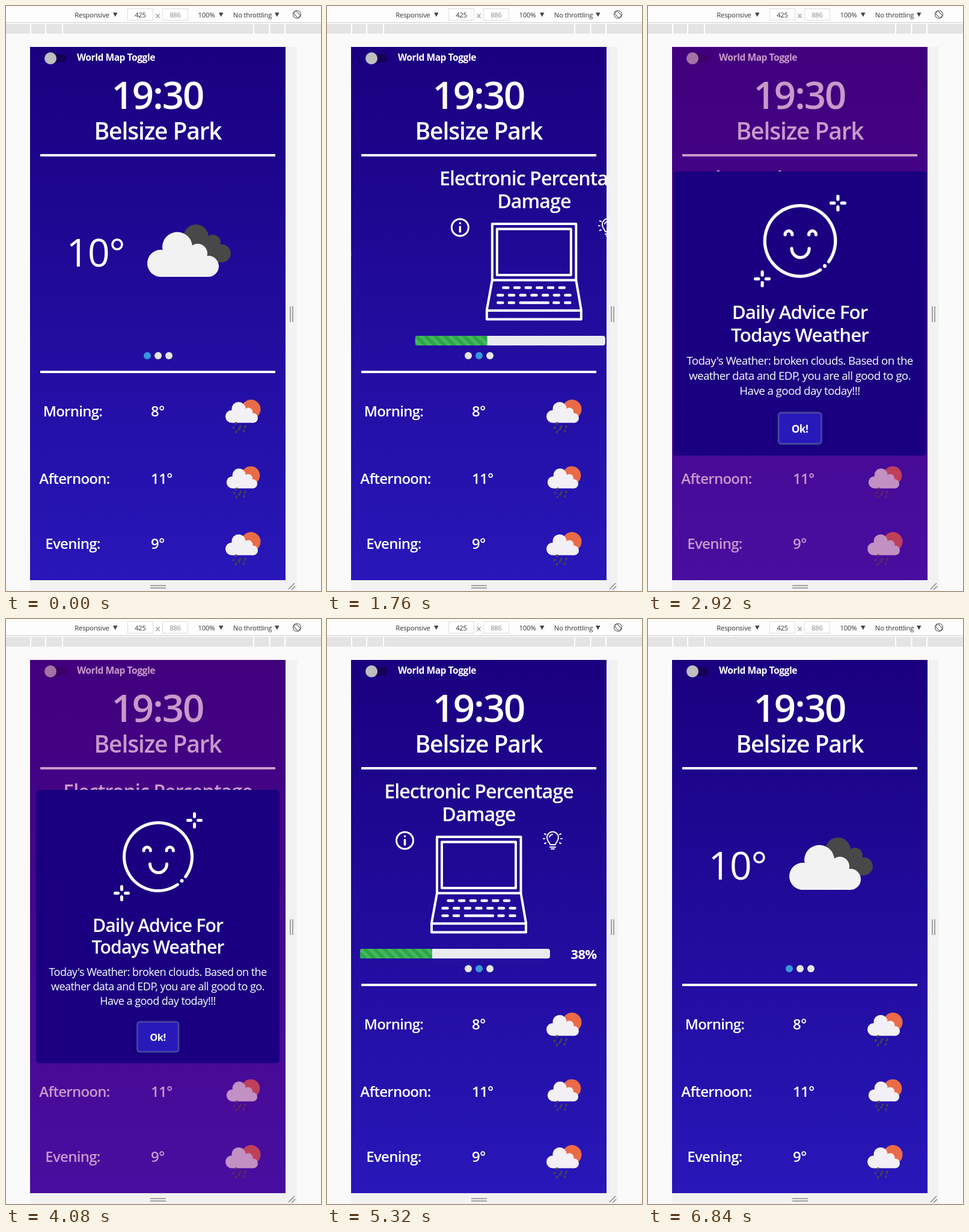
These frames come from a looping animation (524 by 972 pixels, 6880 ms). An HTML page:

```html
<!DOCTYPE html>
<html lang="en">
<head>
<meta charset="utf-8">
<title>Weather app</title>
<style>
  html, body { margin: 0; width: 100%; height: 100%; overflow: hidden; background: #fafafa; }
  svg { display: block; width: 524px; height: 972px; }
  text { font-family: "Open Sans", "Noto Sans", sans-serif; fill: #fff; letter-spacing: -.02em; text-anchor: middle; }
  .semi { font-weight: 600; letter-spacing: -.03em; }
  .bold { font-weight: 700; letter-spacing: -.03em; }
  .body { font-weight: 500; letter-spacing: -.03em; }
  .semi text, .body text { letter-spacing: inherit; }
  .tool text { font-size: 11.3px; fill: #333; }
  .line { fill: none; stroke: #fff; stroke-linecap: round; stroke-linejoin: round; }
  .start { text-anchor: start; }
</style>
</head>
<body>
<svg viewBox="0 0 524 972">
  <defs>
    <linearGradient id="night" x1="0" y1="0" x2="0" y2="1">
      <stop offset="0" stop-color="#1a007f"/>
      <stop offset="1" stop-color="#2817b9"/>
    </linearGradient>
    <clipPath id="panel"><rect x="40" y="68" width="425" height="886"/></clipPath>
    <clipPath id="done"><path d="M175 548v16H59a4 4 0 0 1-4-4v-8a4 4 0 0 1 4-4z"/></clipPath>
    <pattern id="stripes" width="16" height="16" y="548" patternUnits="userSpaceOnUse">
      <path d="M0 0L16 16H8L0 8zM8 0H16V8z" fill="#fff" fill-opacity=".15"/>
    </pattern>
    <g id="shower">
      <circle cx="407.500" cy="670" r="16" fill="#ea6b48"/>
      <g fill="#f2f0f4">
        <circle cx="375.500" cy="682" r="10.500"/>
        <circle cx="387" cy="669.500" r="11.500"/>
        <circle cx="403" cy="675" r="7.500"/>
        <circle cx="411" cy="684.500" r="8"/>
        <path d="M376 672h28l7 10v10.500H376z"/>
      </g>
      <path d="M383 692.500l-1 2M390 698l-1 2M379 699.500l-1 2M398.500 698l-1.500 2.500M388 702l-1 2M396 705.500l-1 2M383 706.500l-1 2"
        stroke="#484848" stroke-width="2.800" stroke-linecap="round"/>
    </g>
    <path id="sparkle" class="line" stroke-width="5" d="M0-11v5M0 6v5M-11 0h5M6 0h5"/>
  </defs>

  <rect width="524" height="972" fill="#fafafa"/>
  <g class="tool">
    <rect width="524" height="28" fill="#fdfdfd"/>
    <path d="M0 27.500H524" stroke="#ccc"/>
    <rect y="30" width="524" height="16" fill="#e4e4e4"/>
    <path d="M41 30v16M66 30v16M94 30v16M412 30v16M438.500 30v16M464 30v16" stroke="#fff" stroke-width="2"/>
    <g fill="#fff" stroke="#ddd">
      <rect x="202.500" y="4.500" width="42" height="19"/>
      <rect x="260.500" y="4.500" width="42" height="19"/>
    </g>
    <text x="143" y="19">Responsive</text>
    <text x="223.500" y="19">425</text>
    <text x="281.500" y="19" style="fill:#888">886</text>
    <text x="333.500" y="19">100%</text>
    <text x="410" y="19">No throttling</text>
    <path d="M178 11h7.500l-3.750 7zM354 11h7.500l-3.750 7zM447 11h7.500l-3.750 7z" fill="#444"/>
    <path d="M249.500 13l6 7M255.500 13l-6 7" stroke="#555"/>
    <g fill="none" stroke="#666" stroke-width="1.200">
      <circle cx="484" cy="14" r="6.500"/>
      <rect x="481" y="8.500" width="6" height="11" rx="1" transform="rotate(-45 484 14)"/>
    </g>
    <path d="M465 68h19v904H40v-18H465z" fill="#f2f2f2"/>
    <path d="M473 499v26M477 499v26M240 963h26M240 967h26M470 969l10-10M475 970l6-6" stroke="#888" stroke-width="1.500"/>
  </g>

  <g clip-path="url(#panel)">
    <rect x="40" y="68" width="425" height="886" fill="url(#night)"/>
    <rect x="66" y="80" width="35" height="14" rx="7" fill="#160057"/>
    <circle cx="74" cy="87" r="10" fill="#bfbfbf"/>
    <text class="bold" x="183" y="91" font-size="15.600">World Map Toggle</text>
    <text class="semi" x="252" y="171" font-size="63.500">19:30</text>
    <text class="semi" x="252.500" y="222" font-size="39">Belsize Park</text>
    <path d="M57 248H448M57 608H448" stroke="#fff" stroke-width="4"/>

    <g id="slides">
      <g>
        <text x="149" y="433" font-size="64">10°</text>
        <g fill="#484848">
          <circle cx="316" cy="384" r="21"/>
          <circle cx="344" cy="393" r="13"/>
          <circle cx="359" cy="411" r="15"/>
          <path d="M316 385h28l15 26v15H316z"/>
        </g>
        <g fill="#f2f2f2">
          <circle cx="257.500" cy="427.500" r="22.500"/>
          <circle cx="285" cy="400.500" r="25"/>
          <circle cx="319" cy="411" r="16"/>
          <circle cx="336.500" cy="432.500" r="17.500"/>
          <path d="M257 407h62l17.500 20v23H257z"/>
        </g>
      </g>
      <g transform="translate(425)">
        <text class="semi" x="252.500" y="298" font-size="32.200">Electronic Percentage</text>
        <text class="semi" x="252.500" y="336" font-size="32.200">Damage</text>
        <g class="line" stroke-width="3">
          <circle cx="129.500" cy="368" r="14"/>
          <path d="M129.500 367v8M129.500 361v.1" stroke-width="3.500"/>
        </g>
        <g class="line" stroke-width="2">
          <path d="M371 375c0-4-5-5-5-12a9.500 9.500 0 0 1 19 0c0 7-5 8-5 12zM371 379h9M373 382h5M370 362a6 6 0 0 1 5-4"/>
          <path d="M360 365h2M389 365h2M362 357l2 1M389 357l-2 1M362 373l2-1M389 373l-2-1"/>
        </g>
        <g class="line" stroke-width="4">
          <path d="M183 455V362H322.500V455M191 370.500H314V447H191zM183 455.500H322.500L331 505V520.500H174V505zM174 506H331"/>
          <path id="keys" stroke-width="4.500"/>
        </g>
        <rect x="55" y="548" width="316" height="16" rx="4" fill="#e9ecef"/>
        <g clip-path="url(#done)">
          <rect x="55" y="548" width="120" height="16" fill="#28a745"/>
          <rect id="bar" x="55" y="548" width="152" height="16" fill="url(#stripes)"/>
        </g>
        <text class="bold" x="427" y="565" font-size="22">38%</text>
      </g>
    </g>

    <circle class="dot" cx="235" cy="581" r="6"/>
    <circle class="dot" cx="253" cy="581" r="6"/>
    <circle class="dot" cx="271" cy="581" r="6"/>

    <g class="semi" font-size="24">
      <text x="111" y="682">Morning:</text>
      <text x="114" y="794">Afternoon:</text>
      <text x="111" y="902">Evening:</text>
      <text class="start" x="241" y="682">8°</text>
      <text class="start" x="241" y="794">11°</text>
      <text class="start" x="241" y="902">9°</text>
    </g>
    <use href="#shower"/>
    <use href="#shower" transform="translate(20 143.500) scale(.95)"/>
    <use href="#shower" y="220"/>

    <rect id="backdrop" x="40" y="68" width="425" height="886" fill="#7b0078"/>
    <g id="modal">
      <rect x="50" y="284" width="405" height="454" rx="5" fill="#1a0080"/>
      <g class="line" stroke-width="5">
        <path id="face"/>
        <path d="M292.500 435v.1" stroke-width="6"/>
        <path d="M229 385a5.700 6 0 0 1 11.400 0M267 385a5.700 6 0 0 1 11.400 0M239.500 407a14 14.500 0 0 0 28 0"/>
      </g>
      <use href="#sparkle" x="313.500" y="334.500"/>
      <use href="#sparkle" x="192.500" y="455.500"/>
      <g class="semi" font-size="30.200">
        <text x="252.500" y="520">Daily Advice For</text>
        <text x="252.500" y="556">Todays Weather</text>
      </g>
      <g class="body" font-size="18">
        <text x="252.500" y="593">Today's Weather: broken clouds. Based on the</text>
        <text x="252.500" y="617">weather data and EDP, you are all good to go.</text>
        <text x="252.500" y="641">Have a good day today!!!</text>
      </g>
      <rect x="218.500" y="669.500" width="68.500" height="49.500" rx="4" fill="#2819bb" stroke="#474b9e" stroke-width="2.500"/>
      <text class="bold" x="252.500" y="701" font-size="16.500">Ok!</text>
    </g>
  </g>
</svg>
<script>
const LOOP = 6880, SLIDE = 425;
const SWIPE_ON = 1520, SWIPE_BACK = 5880, SWIPE_MS = 500;
const OPEN = 2815, CLOSE = 5090;
const $ = id => document.getElementById(id);
const clamp = v => Math.min(1, Math.max(0, v));
const mix = (a, b, k) => a + (b - a) * k;

// CSS "ease": cubic-bezier(.25, .1, .25, 1)
function ease(x) {
  if (x <= 0 || x >= 1) return clamp(x);
  const curve = (a, b, s) => 3 * a * s * (1 - s) ** 2 + 3 * b * s * s * (1 - s) + s ** 3;
  let lo = 0, hi = 1;
  for (let i = 0; i < 24; i++) {
    const mid = (lo + hi) / 2;
    if (curve(.25, .25, mid) < x) lo = mid; else hi = mid;
  }
  return curve(.1, 1, lo);
}
const progress = (t, start, ms) => ease(clamp((t - start) / ms));

// Popup bounce: .7 → 1.05 → .95 → 1 over 300 ms
function popScale(age) {
  if (age < 135) return mix(.7, 1.05, ease(age / 135));
  if (age < 240) return mix(1.05, .95, ease((age - 135) / 105));
  return mix(.95, 1, progress(age, 240, 60));
}

function buildShapes() {
  let keys = "";
  const key = (x, y, w = 8) => keys += `M${x} ${y}h${w}`;
  for (let i = 0; i < 6; i++) key(201.500 + i * 18.700, 468);
  for (let i = 0; i < 7; i++) key(192.500 + i * 18.700, 480.500);
  [192.500, 211, 285.500, 304.500].forEach(x => key(x, 493));
  key(230, 493, 46);
  $("keys").setAttribute("d", keys);

  const point = deg => {
    const a = deg * Math.PI / 180;
    return `${253 + 56.500 * Math.cos(a)} ${395 + 56.500 * Math.sin(a)}`;
  };
  $("face").setAttribute("d", `M${point(55)}A56.500 56.500 0 1 1 ${point(36)}`);
}

const dots = document.querySelectorAll(".dot");

function render(t) {
  const shift = progress(t, SWIPE_ON, SWIPE_MS) - progress(t, SWIPE_BACK, SWIPE_MS);
  $("slides").setAttribute("transform", `translate(${-SLIDE * shift})`);
  const active = t >= SWIPE_ON && t < SWIPE_BACK ? 1 : 0;
  dots.forEach((dot, i) => dot.setAttribute("fill", i === active ? "#3498db" : "#e6e6e6"));
  $("bar").setAttribute("transform", `translate(${-16 * (t % 1000) / 1000})`);

  const shade = progress(t, OPEN, 100) - progress(t, CLOSE, 100);
  $("backdrop").setAttribute("opacity", .4 * shade);

  const leaving = progress(t, CLOSE, 150);
  const scale = popScale(Math.max(0, t - OPEN)) * mix(1, .5, leaving);
  const modal = $("modal");
  modal.setAttribute("visibility", t >= OPEN && leaving < 1 ? "visible" : "hidden");
  modal.setAttribute("opacity", 1 - leaving);
  modal.setAttribute("transform", `translate(252.500 511) scale(${scale}) translate(-252.500 -511)`);
}

buildShapes();
const begin = performance.now();
function tick() {
  render((performance.now() - begin) % LOOP);
  requestAnimationFrame(tick);
}
tick();
</script>
</body>
</html>
```
